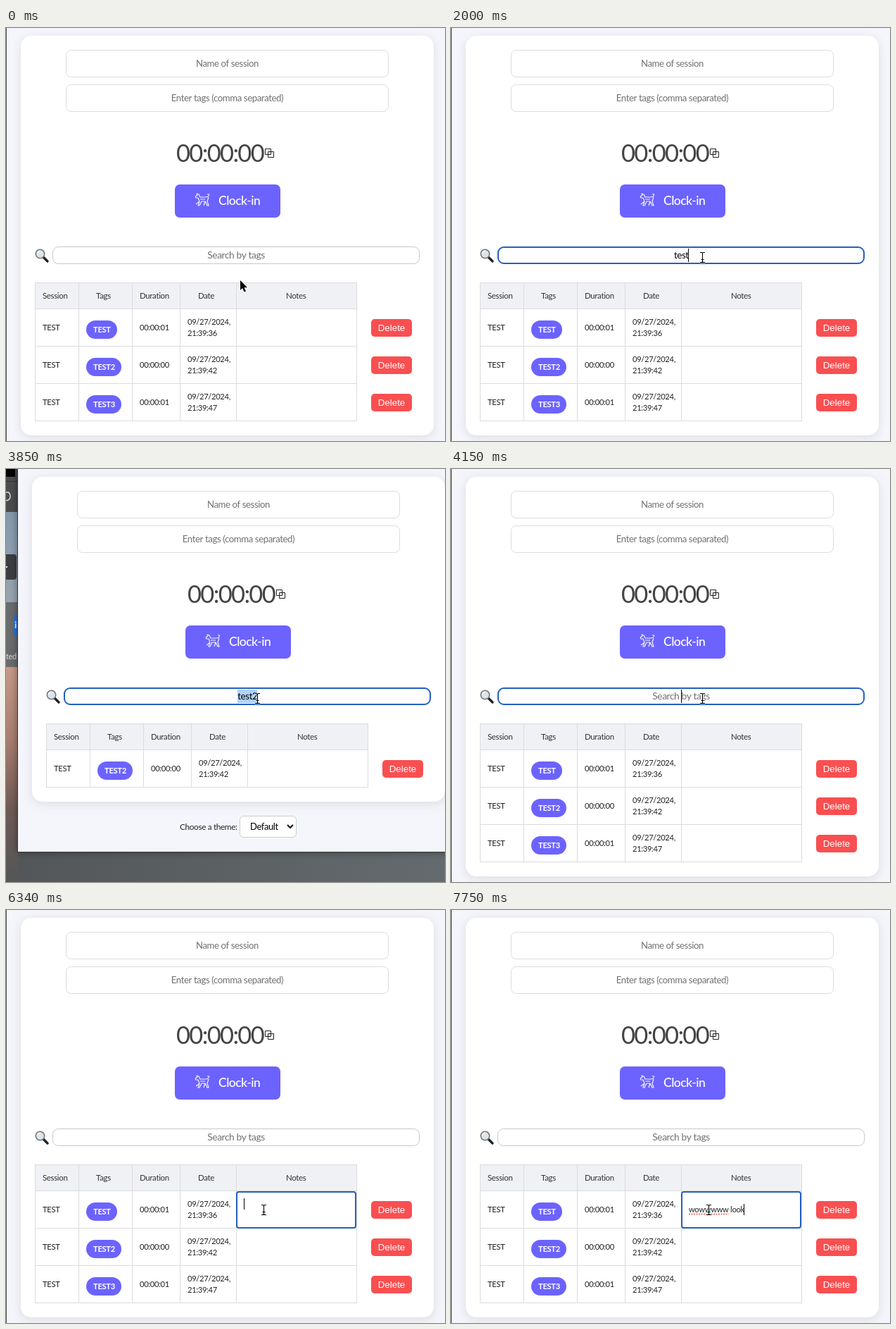
An HTML page with a canvas that plays this animation: 624 px wide and 586 px high, repeating every 8000 ms.

```html
<!DOCTYPE html>
<html lang="en">
<head>
<meta charset="utf-8">
<title>Session timer</title>
<style>
  html, body { margin: 0; width: 100%; height: 100%; overflow: hidden; }
  canvas { display: block; }
</style>
</head>
<body>
<canvas width="624" height="586"></canvas>
<script>
const ctx = document.querySelector('canvas').getContext('2d');
const LOOP = 8000, BLINK = 480;
const BLUE = '#2460c0', VIOLET = '#6c63ff', LINE = '#dcdcdc', INK = '#222', PAGE = '#f5f6fb';
const COLUMNS = [41, 103, 179, 247, 327, 498];
const SEARCH_KEYS = [1710, 1770, 1950, 2000];
const NOTE_KEYS = [6520, 6575, 6630, 6810, 6908, 7007, 7105, 7203, 7400, 7580, 7665, 7750];
const NOTE = 'wowwwww look';
const ROWS = [['TEST', '00:00:01', '21:39:36'], ['TEST2', '00:00:00', '21:39:42'], ['TEST3', '00:00:01', '21:39:47']];

function rect(x, y, w, h, color) {
  ctx.fillStyle = color;
  ctx.fillRect(x, y, w, h);
}

function box(x, y, w, h, r, fill, stroke, line = 1) {
  const inset = stroke ? line / 2 : 0;
  ctx.beginPath();
  ctx.roundRect(x + inset, y + inset, w - 2 * inset, h - 2 * inset, r);
  ctx.fillStyle = fill;
  ctx.fill();
  if (stroke) {
    ctx.strokeStyle = stroke;
    ctx.lineWidth = line;
    ctx.stroke();
  }
}

function setFont(size, weight = 400, tracking = -0.03) {
  ctx.font = `${weight} ${size}px Lato, "Open Sans", sans-serif`;
  ctx.letterSpacing = size * tracking + 'px';
}

function text(str, x, y, size, color = INK, align = 'left', weight, tracking) {
  setFont(size, weight, tracking);
  ctx.textAlign = align;
  ctx.fillStyle = color;
  ctx.fillText(str, x, y);
}

function strokePath(d, color, width) {
  ctx.strokeStyle = color;
  ctx.lineWidth = width;
  ctx.stroke(new Path2D(d));
}

function at(x, y, draw) {
  ctx.save();
  ctx.translate(x, y);
  draw();
  ctx.restore();
}

function vertical(y0, y1, ...colors) {
  const g = ctx.createLinearGradient(0, y0, 0, y1);
  colors.forEach((c, i) => g.addColorStop(i / (colors.length - 1), c));
  return g;
}

const typed = (keys, t) => keys.filter(k => k <= t).length;
const blinkOn = (t, since) => Math.floor(Math.max(0, t - since) / BLINK) % 2 === 0;

function steps(t, start, end, count) {
  const k = Math.floor((t - start) / (end - start) * (count - 1) + 1e-6) + 1;
  const p = Math.min(count, Math.max(0, k)) / count;
  return p * p * (3 - 2 * p);
}

function desktop() {
  const bottom = ctx.createLinearGradient(0, 0, 624, 0);
  bottom.addColorStop(0, '#535658');
  bottom.addColorStop(1, '#646b6e');
  rect(0, 0, 624, 586, bottom);
  rect(0, 280, 17, 306, vertical(280, 586, '#c79a88', '#a97e70', '#705a55', '#535658'));
  rect(0, 0, 17, 61, '#4b4c4e');
  rect(0, 0, 13, 11, '#000');
  rect(0, 17, 17, 1, '#333');
  strokePath('M0 33H3Q6 34 6 39T0 45', '#d8d8d8', 1.5);
  rect(0, 61, 17, 128, vertical(61, 189, '#8499ae', '#98a5b0'));
  box(-8, 121, 23, 36, 4, '#3b3d41');
  rect(0, 138, 2, 2, '#ddd');
  rect(0, 189, 17, 92, '#696b6d');
  rect(11, 207, 6, 30, '#2f6fd0');
  text('i', 12, 226, 13, '#fff', 'left', 700);
  text('ted', 0, 270, 11, '#ddd');
  ctx.save();
  ctx.shadowColor = 'rgba(0,0,0,.4)';
  ctx.shadowBlur = 10;
  rect(16, -20, 640, 564, '#38393b');
  ctx.restore();
  rect(17, 0, 607, 543, PAGE);
}

function magnifier() {
  ctx.lineCap = 'round';
  strokePath('M53.5 325.5L59 331', '#222', 3.4);
  ctx.lineCap = 'butt';
  box(41.5, 313.5, 14, 14, 7, '#dbe4ea', '#777', 1.6);
  strokePath('M44.5 320Q45 316.5 48.5 316.5', '#fff', 1.4);
}

function clockButton() {
  box(240, 222, 150, 47, 7, VIOLET);
  ctx.lineJoin = 'round';
  strokePath('M269 239L272 237L271 235L274 236L276 240H284Q287 240 288 238Q290 235 286 236' +
    'M269 239L270 241H273L275 246L273 252H275L278 246H283L286 252H288L286 246L288 240' +
    'M275 246L270 250M283 246L281 252M276 243H283', '#f4f3ff', 1.2);
  text('Clock-in', 302, 251, 17.5, '#fff', 'left', 500);
}

function searchBox(query, focused, caret, selected) {
  box(66, 310, 522, 25, 8, '#fff', focused ? BLUE : '#c8c8c8', focused ? 2 : 1);
  setFont(13.4);
  const half = ctx.measureText(query).width / 2;
  if (selected) rect(313, 313, 28, 19, '#b0d2f8');
  if (query) text(query, 327.3, 327, 13.4, '#000', 'center');
  else text('Search by tags', 327, 327, 13.8, '#717171', 'center');
  if (caret) rect(Math.floor(327 + half - (query ? 0.4 : 0)), 313, 1, 19, '#000');
}

function table(rows) {
  const bottom = 398 + 53 * rows.length;
  rect(41, 361, 458, bottom - 360, '#fff');
  rect(41, 361, 458, 38, '#f0f1f5');
  COLUMNS.forEach(x => rect(x, 361, 1, bottom - 360, LINE));
  rect(41, 361, 458, 1, LINE);
  ['Session', 'Tags', 'Duration', 'Date', 'Notes'].forEach((label, i) =>
    text(label, [52, 128, 190, 273, 398][i], 384, 11.5, '#333'));
  rect(41, 398, 458, 1, LINE);
  rows.forEach(([tag, duration, clock], i) => {
    const y = 398 + 53 * i;
    rect(41, y + 53, 458, 1, LINE);
    text('TEST', 52, y + 31, 11.2);
    box(114, y + 17, tag.length > 4 ? 50 : 44, 26, 13, VIOLET);
    text(tag, 124, y + 34, 11.2, '#fff', 'left', 700);
    text(duration, 190, y + 31, 11.2);
    text('09/27/2024,', 258, y + 23, 11.2);
    text(clock, 258, y + 39, 11.2);
    box(519, y + 15, 58, 25, 5, '#f94f51');
    ctx.font = '13.33px "Liberation Sans", Arial, sans-serif';
    ctx.letterSpacing = '0px';
    ctx.textAlign = 'center';
    ctx.fillStyle = '#fff';
    ctx.fillText('Delete', 548, y + 32);
  });
}

function themePicker() {
  text('Choose a theme:', 231, 512, 11.8);
  box(316, 492, 81, 31, 5, '#fff', '#ccc');
  text('Default', 331, 512, 13, '#000');
  strokePath('M384 505L388 509L392 505', '#111', 2);
}

function noteCell(t) {
  const note = NOTE.slice(0, typed(NOTE_KEYS, t));
  box(327, 399, 171, 53, 3, '#fff', BLUE, 2);
  text(note, 338, 429, 11.2, '#222');
  const end = 338 + ctx.measureText(note).width;
  if (t >= 7302) {
    ctx.setLineDash([2, 1.5]);
    strokePath(`M338 431.5H${338 + ctx.measureText('wowwwww').width}`, '#e0504c', 1.5);
    ctx.setLineDash([]);
  }
  if (note) rect(Math.floor(end), 417, 1, 16, '#000');
  else if (blinkOn(t, 5380)) rect(338, 409, 1, 16, '#000');
}

function page(t, filtered) {
  ctx.save();
  ctx.shadowColor = 'rgba(0,0,0,.1)';
  ctx.shadowBlur = 14;
  ctx.shadowOffsetY = 3;
  box(21, 11, 587, filtered ? 461 : 567, 15, '#fff');
  ctx.restore();

  ['Name of session', 'Enter tags (comma separated)'].forEach((label, i) => {
    box(85, 31 + 49 * i, 459, 39, 7, '#fff', LINE);
    text(label, 314.5, 55 + 49 * i, 13.2, '#717171', 'center');
  });
  text('00:00:00', 242, 190, 34.5, '#444', 'left', 400, -0.048);
  strokePath('M368.5 171.5H376.5V179.5H368.5ZM372.5 175.5H380.5V183.5H372.5Z', '#222', 1);
  at(filtered ? -1 : 0, 0, clockButton);
  magnifier();

  const query = filtered ? 'test2' : t < 2300 ? 'test'.slice(0, typed(SEARCH_KEYS, t)) : '';
  const focused = t >= 870 && t < 5330;
  const selected = filtered && t >= 3850;
  const since = [870, ...SEARCH_KEYS, 2300, 4150].filter(k => k <= t).pop();
  searchBox(query, focused, focused && !selected && blinkOn(t, since), selected);

  table(filtered ? [ROWS[1]] : ROWS);
  if (filtered) themePicker();
  if (t >= 5330) noteCell(t);
}

function pointer(t) {
  const a = steps(t, 120, 470, 5), b = steps(t, 700, 785, 2), c = steps(t, 4980, 5260, 5);
  const x = 333 + 35 * a - 11 * b + 9 * c;
  const y = 358 - 33 * a + 100 * c;
  const beam = t >= 700 && (y < 336 || y > 399);
  ctx.lineJoin = 'round';
  at(Math.round(x), Math.round(y), () => {
    if (beam) {
      const d = 'M-3 -6.5H-1Q.5 -6.5 .5 -5Q.5 -6.5 2 -6.5H4M.5 -5.5V6.5M-3 7.5H-1Q.5 7.5 .5 6Q.5 7.5 2 7.5H4M-1.5 3.5H2.5';
      strokePath(d, 'rgba(255,255,255,.8)', 2.6);
      strokePath(d, '#000', 1.1);
    } else {
      const d = 'M0 0V14L3 11L5.5 16.5L8 15.5L5.5 10.3H10Z';
      strokePath(d, '#fff', 2);
      ctx.fillStyle = '#000';
      ctx.fill(new Path2D(d));
    }
  });
}

function frame(now) {
  const t = now % LOOP;
  const filtered = t >= 2300 && t < 4150;
  if (filtered) desktop();
  else {
    rect(0, 0, 624, 586, PAGE);
    rect(0, 0, 1, 586, '#4c4d50');
  }
  at(filtered ? 16 : 0, 0, () => page(t, filtered));
  pointer(t);
  requestAnimationFrame(() => frame(performance.now()));
}
frame(performance.now());
</script>
</body>
</html>
```
